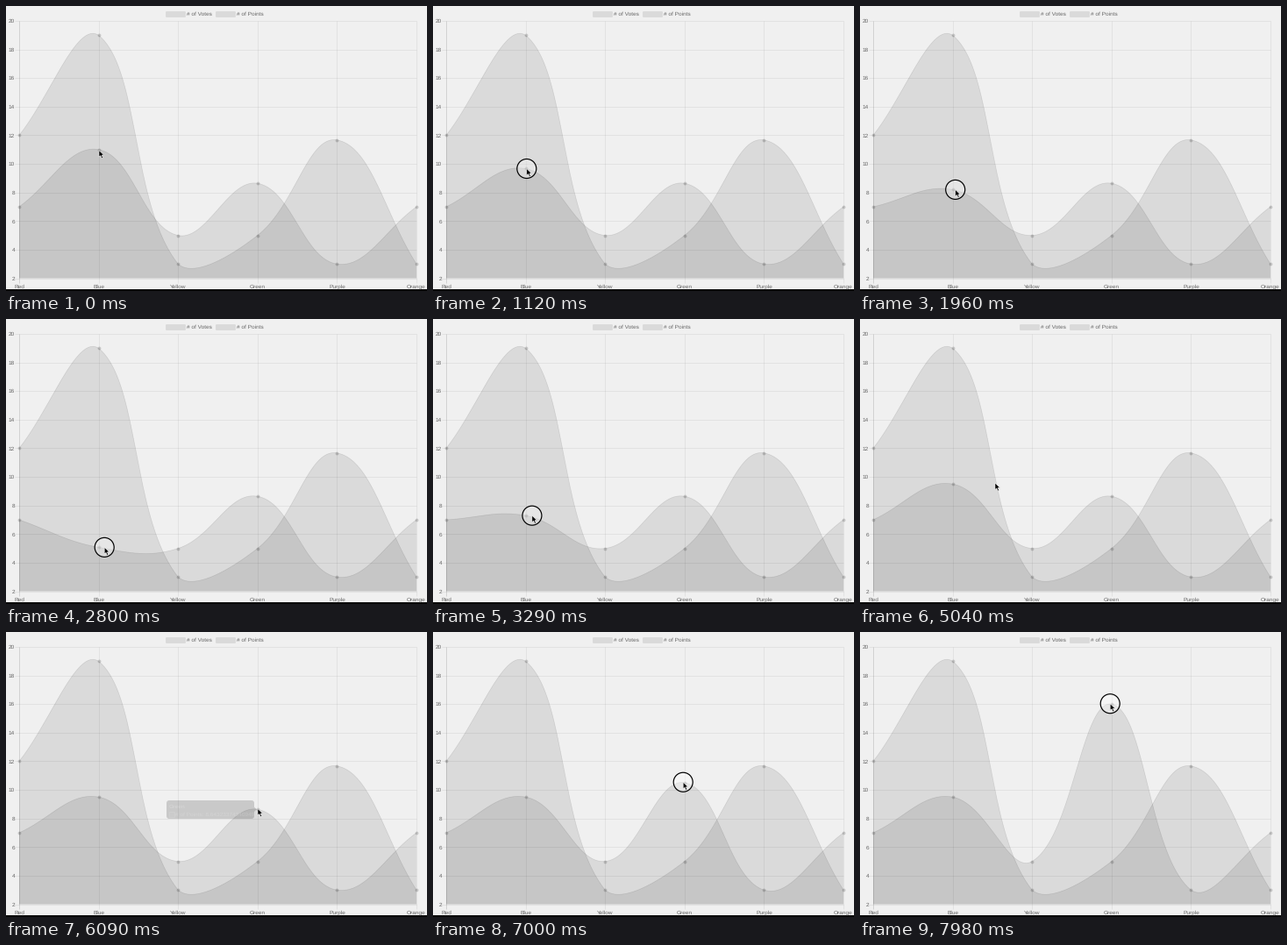
A matplotlib script that plays this animation: 480x325 px, repeating every 8 s.

```python
import numpy as np
import matplotlib.pyplot as plt
from matplotlib.animation import FuncAnimation
from matplotlib.patches import Circle, FancyBboxPatch, Polygon, Rectangle

W, H, DPI = 480, 325, 100
PX = 72 / DPI                      # points per pixel
LOOP, TICK, STEP = 8000, 20, 70    # ms
LEFT, RIGHT, TOP, BOTTOM = 15, 468, 17, 310.5
LABELS = ["Red", "Blue", "Yellow", "Green", "Purple", "Orange"]
VOTES = [12, 19, 3, 5, 11.67, 3]
POINTS = [7, 11, 5, 8.64, 3, 7]
FONT = 6.45 * PX
TENSION = 0.4
XS = np.linspace(LEFT, RIGHT, len(LABELS))

plt.rcParams["font.family"] = "Liberation Sans"
plt.rcParams["text.hinting"] = "none"

fig = plt.figure(figsize=(W / DPI, H / DPI), dpi=DPI, facecolor="#f0f0f0")
ax = fig.add_axes([0, 0, 1, 1])
ax.set_xlim(0, W)
ax.set_ylim(H, 0)
ax.axis("off")


def to_y(value):
    return BOTTOM - (np.asarray(value, float) - 2) / 18 * (BOTTOM - TOP)


def ease(t, t0, t1, a, b):
    u = min(max((t - t0) / (t1 - t0), 0), 1)
    return a + (b - a) * u * u * (3 - 2 * u)


def spline(values):
    """Cubic curve through the values, control points kept inside the plot."""
    p = np.column_stack([XS, to_y(values)])
    before = np.vstack([p[:1], p[:-1]])
    after = np.vstack([p[1:], p[-1:]])
    d0 = np.hypot(*(p - before).T)
    d1 = np.hypot(*(after - p).T)
    share = (TENSION * d0 / (d0 + d1))[:, None]
    span = after - before
    low, high = (LEFT, TOP), (RIGHT, BOTTOM)
    c_in = np.clip(p - share * span, low, high)
    c_out = np.clip(p + (TENSION - share) * span, low, high)
    u = np.linspace(0, 1, 40)[:, None]
    parts = [(1 - u) ** 3 * p[k] + 3 * u * (1 - u) ** 2 * c_out[k]
             + 3 * u * u * (1 - u) * c_in[k + 1] + u ** 3 * p[k + 1]
             for k in range(len(p) - 1)]
    return p, np.vstack(parts)


def label(x, y, text, ha="left", color="#666666", **kw):
    return ax.text(x, y, text, ha=ha, va="center_baseline", color=color,
                   fontsize=FONT, **kw)


def rule(x, y, alpha):
    ax.plot(x, y, color="black", alpha=alpha, lw=PX, zorder=1,
            solid_capstyle="butt")


# Grid, axes and legend
for v in range(2, 21, 2):
    y = float(to_y(v))
    rule([LEFT - 5, RIGHT], [y, y], 0.055)
    label(10, y, str(v), ha="right")
for x, name in zip(XS, LABELS):
    rule([x, x], [TOP, BOTTOM + 5], 0.12 if x == LEFT else 0.055)
    label(x, 319.5, name, ha="center")
for x, name in ((182, "# of Votes"), (239, "# of Points")):
    ax.add_patch(Rectangle((x, 5.5), 21.5, 6.5, fc=(0, 0, 0, 0.09),
                           ec=(0, 0, 0, 0.06), lw=0.6 * PX))
    label(x + 24, 9, name)
ax.add_patch(Rectangle((0, 323.4), W, 2, fc="black", lw=0))


class Series:
    def __init__(self):
        self.area = ax.add_patch(Polygon([(0, 0), (1, 1)], fc="black",
                                         alpha=0.09, lw=0, zorder=2))
        self.line, = ax.plot([], [], color="black", alpha=0.1, lw=0.7 * PX,
                             zorder=3)
        self.dots, = ax.plot([], [], "o", color="black", alpha=0.17, mew=0,
                             ms=3.8 * PX, zorder=4)

    def update(self, values):
        knots, curve = spline(values)
        self.area.set_xy(np.vstack([curve, (RIGHT, BOTTOM), (LEFT, BOTTOM)]))
        self.line.set_data(*curve.T)
        self.dots.set_data(*knots.T)


votes, points = Series(), Series()

# Tooltip: (artist, full opacity)
tip = [
    (ax.add_patch(FancyBboxPatch((186, 195), 94, 15, fc="black", lw=0,
                                 boxstyle="round,pad=3,rounding_size=3",
                                 zorder=5)), 0.8),
    (ax.add_patch(Polygon([(283, 199.5), (285.7, 202.2), (283, 205)],
                          fc="black", lw=0, zorder=5)), 0.8),
    (ax.add_patch(Rectangle((186, 204.5), 6, 6, fc="#d8d8d8", ec="white",
                            lw=0.5 * PX, zorder=6)), 1),
    (label(186, 198.5, "Green", color="white", weight="bold", zorder=6), 1),
    (label(193.3, 207.5, "# of Points: 8.64323374340949", color="white",
           zorder=6), 1),
]

# Pointer
ring = ax.add_patch(Circle((0, 0), 11, fc=(1, 1, 1, 0.35), ec="black",
                           lw=1.2 * PX, zorder=8))
ARROW = np.array([(0, 0), (0, 7.6), (1.8, 6), (3.1, 9), (4.5, 8.4),
                  (3.2, 5.5), (5.6, 5.4)])
arrow = ax.add_patch(Polygon(ARROW, fc="black", ec="white", lw=0.5 * PX,
                             zorder=9))


def blue_value(t):
    if t <= 2100:
        return np.interp(t, [0, 210, 490, 840, 980, 1260, 1330, 1960],
                         11 - 2.8 / 21 * np.array([0, 3, 3, 8, 8, 12, 12, 21]))
    if t <= 2870:
        return ease(t, 2100, 2870, 8.2, 5)
    if t <= 4060:
        return ease(t, 2870, 4060, 5, 16)
    return ease(t, 4060, 4690, 16, 9.5)


def green_value(t):
    if t < 7840:
        return ease(t, 6650, 7700, 8.64, 15.85)
    return ease(t, 7840, 7980, 15.85, 16)


def pointer(t, blue, green):
    """Position of the arrow's tip and whether the button is down."""
    if t <= 4690:
        x = np.interp(t, [0, 1400, 1960, 2100, 2800, 3850, 4690],
                      [106, 107, 108.7, 108.7, 112.2, 114, 113])
        return x, float(to_y(blue)) + (0.8 if t < 70 else 0), t >= 70
    if t < 6580:
        times = [4690, 4900, 4970, 5040, 6020, 6160, 6440]
        x = np.interp(t, times, [113, 143, 143, 154, 287, 287, 308])
        y = np.interp(t, times, [188, 187, 187, 187, 201.5, 202, 218.5])
        return x, y, False
    return 285.2, float(to_y(green)) - 0.5, True


def update(i):
    t = i * TICK // STEP * STEP
    blue, green = blue_value(t), green_value(t)
    votes.update(VOTES)
    points.update([POINTS[0], blue, POINTS[2], green, *POINTS[4:]])

    fade = np.interp(t, [5950, 6090, 6200, 6440], [0, 0.4, 0.75, 0])
    for artist, full in tip:
        artist.set_alpha(full * fade)
        artist.set_visible(fade > 0)

    x, y, down = pointer(t, blue, green)
    ring.center = (x, y)
    ring.set_visible(down)
    arrow.set_xy(ARROW + (x, y))
    return []


anim = FuncAnimation(fig, update, frames=LOOP // TICK, interval=TICK,
                     init_func=lambda: update(0), repeat=True, repeat_delay=0)
plt.show()
```
